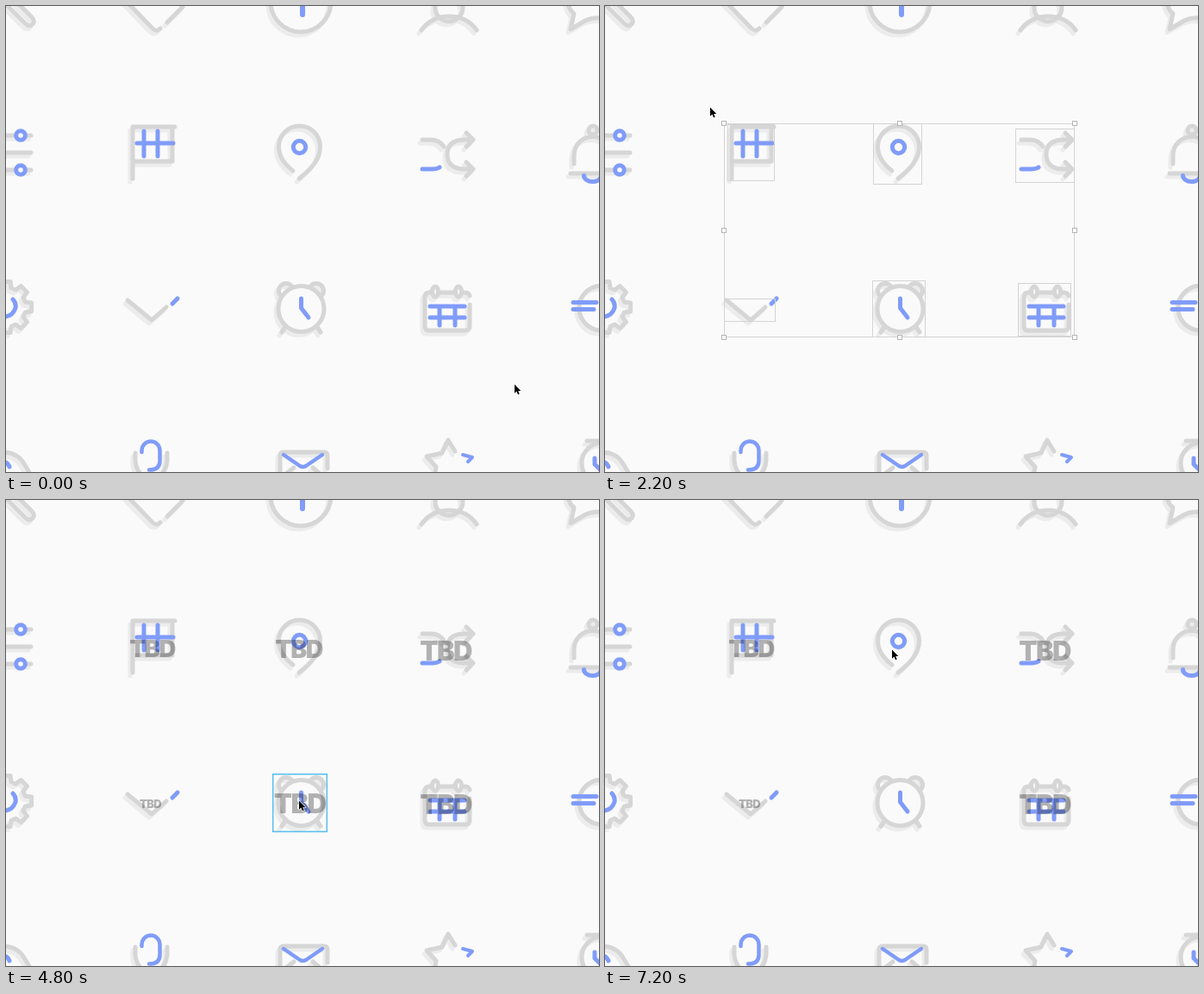
An HTML page that plays this animation: 688 by 540 pixels, repeating every 7.4 s.

```html
<!DOCTYPE html>
<html lang="en">
<head>
<meta charset="utf-8">
<title>Icon selection</title>
<style>
  html, body { margin: 0; width: 100%; height: 100%; overflow: hidden; background: #fafafa; }
  svg { display: block; width: 688px; height: 540px; }
  .line, .shade, .accent { fill: none; stroke-width: 5; stroke-linecap: round; stroke-linejoin: round; }
  .line { stroke: #d6d6d6; }
  .shade { stroke: #ececec; }
  .accent { stroke: #809cf9; }
  .solid { fill: #fafafa; }
  .label { font-family: Inter, "Open Sans", sans-serif; font-weight: 900; letter-spacing: -.055em; text-anchor: middle; fill: #000; fill-opacity: .29; }
  .frame { fill: none; stroke: #d4d4d4; }
  .handle { fill: #fff; stroke: #b4b4b4; }
  #marquee { fill: #000; fill-opacity: .036; stroke: #000; stroke-opacity: .12; }
  #hover { fill: none; stroke: #5cc0ee; stroke-width: 1.6; }
</style>
</head>
<body>
<svg viewBox="0 0 688 540">
  <g id="icons"></g>
  <g id="selection"></g>
  <rect id="hover"/>
  <rect id="marquee"/>
  <path id="cursor" d="M0 .5V10.700L2.400 8.600L4 12.300L5.700 11.600L4.200 8H7.300Z" fill="#000" stroke="#fff" stroke-width="1.2" paint-order="stroke"/>
</svg>
<script>
const LOOP = 7400, TICK = 100;
const $ = id => document.getElementById(id);
const path = d => `<path d="${d}"/>`;
const circle = (x, y, r, cls = '') => `<circle cx="${x}" cy="${y}" r="${r}" class="${cls}"/>`;
const oval = (x, y) => `<ellipse cx="${x}" cy="${y}" rx="3.5" ry="6" class="solid"/>`;

function gear(x, y, inner, outer) {
  const pts = [];
  for (let i = 0; i < 8; i++) {
    for (const [da, r] of [[-.27, inner], [-.17, outer], [.17, outer], [.27, inner]]) {
      const a = i * Math.PI / 4 + da;
      pts.push((x + r * Math.cos(a)).toFixed(1) + ' ' + (y + r * Math.sin(a)).toFixed(1));
    }
  }
  return path('M' + pts.join('L') + 'Z');
}

// box: x1, y1, x2, y2; label: centre x, baseline, size
const icons = [
  { line: path('M2 0L22 20Q27 25 31 21Q34 17 30 13L14 -3') },
  { line: path('M141 -4L169 25Q174 31 179 26M187 19L205 1') },
  { line: circle(342, -5, 35), accent: path('M344 -5V10'), width: 6 },
  { line: circle(514, 2, 16) + path('M482 28Q493 12 514 12Q535 12 546 28') },
  { line: path('M652 -4Q653 4 659 9L655 27L672 17Q680 13 692 14') },

  { line: path('M-4 150H29M-4 170H29M-4 190H29'),
    accent: circle(17, 150, 5.3, 'solid') + circle(17, 190, 5.3, 'solid') },
  { line: path('M147 200V140H196M193 140V180H148'),
    accent: path('M152 159H194M160 145V174M176 145V174'),
    box: [142, 137, 197, 203], label: [169.5, 181.5, 27.5] },
  { line: path('M333 191C320 181 316.500 172 316.500 163A24 24 0 0 1 364.500 163C364.500 178 355 188 340 200'),
    accent: circle(340.5, 163.5, 7.2),
    box: [311, 136, 368, 207], label: [339.5, 183, 28.5] },
  { line: path('M483 155H493Q503 155 508 163M541 155H530Q512 156 512 172Q512 188 530 189H541M534 147L542 155L534 163M534 181L542 189L534 197'),
    accent: path('M483 189H494Q500 189 503 187'),
    box: [476, 142, 545, 205], label: [510, 185.5, 31] },
  { line: circle(681, 144, 5) + path('M659 183V174C659 144 703 144 703 174V183M655 194H695'),
    accent: path('M670.500 196.500A10 7 0 0 0 690.500 196.500') },

  { line: gear(0, 349, 23, 30), accent: path('M8 340Q12 344 11 350Q8 359 -1 360') },
  { line: path('M141 341L169 364L186 349'), accent: path('M193 345L199 339'),
    box: [138, 339, 198, 366], label: [167.5, 357, 13] },
  { line: circle(325, 330, 8.5) + circle(360, 330, 8.5) + path('M324 372L320 378M361 372L365 378') + circle(342.5, 351, 26.5, 'solid'),
    accent: path('M342.500 339V350L351 361'),
    box: [310, 318, 372, 384], label: [340.5, 363, 31] },
  { line: path('M538 336Q537 332 532 332H491Q486 332 486 337V371Q486 376 491 376H533Q538 376 538 371V346') + oval(498, 331) + oval(525, 331),
    accent: path('M492 348H532M492 361H532M503 348V370M521 348V370'),
    box: [479, 321, 541, 383], label: [510, 363.5, 31] },
  { line: circle(691, 350, 26), accent: path('M658 343.500H685M658 351.500H682') },

  { line: path('M-4 517Q14 517 22 532L28 542'), accent: path('M-3 528Q2 529 4 534') },
  { line: path('M150 518V527Q151 538 158 544M187 518V527Q186 538 179 544'),
    accent: path('M157.500 517V515A10.500 10.500 0 0 1 178.500 515V527Q178.500 537 168 537.500H166'), width: 4.5 },
  { line: path('M318 544V521Q318 517 322 517H369Q373 517 373 521V536M326 541L334 535M356 535L363 541'),
    accent: path('M322 520L341 533Q344.500 535 348 533L367 520'), width: 4.5 },
  { line: path('M521 516L513 503L506 518L488 522L499 534L497 546'),
    accent: path('M530 520L541 523L536 528'), width: 4 },
  { line: path('M674 504H692') + circle(692, 530, 24), accent: path('M683 524V531L690 538') }
];

$('icons').innerHTML = icons.map(({ line, accent = '', width = 5, label }) => `
  <g class="shade" transform="translate(-3 4)">${line}</g>
  <g class="line">${line}</g>
  <g class="accent" style="stroke-width:${width}">${accent}</g>
  ${label ? `<text class="label" x="${label[0]}" y="${label[1]}" font-size="${label[2]}">TBD</text>` : ''}`).join('');

const targets = icons.filter(i => i.box);
const labels = [...document.querySelectorAll('.label')];
const PIN = 1, CLOCK = 4;
const START = [590.5, 438.5];

// time, x, y
const track = [
  [0, 590, 438], [900, 123, 118], [1000, 122, 117], [2600, 122, 117],
  [3400, 146, 155], [4300, 316, 408], [4500, 316, 408], [4800, 340, 348],
  [5400, 340, 348], [6200, 362, 230], [6300, 354, 220], [6600, 333, 173]
];

function cursorAt(t) {
  const i = track.findIndex(k => k[0] > t);
  if (i < 0) return track[track.length - 1].slice(1);
  const [t0, x0, y0] = track[i - 1], [t1, x1, y1] = track[i];
  const e = (1 - Math.cos(Math.PI * (t - t0) / (t1 - t0))) / 2;
  return [x0 + (x1 - x0) * e, y0 + (y1 - y0) * e];
}

const during = (t, from, to) => t >= from && t < to;
const show = (el, on) => { el.style.display = on ? '' : 'none'; };

function place(el, [x1, y1, x2, y2]) {
  const attrs = { x: x1, y: y1, width: x2 - x1, height: y2 - y1 };
  for (const name in attrs) {
    el.setAttribute(name, Math.max(0, attrs[name]));
  }
}

function frame([x1, y1, x2, y2]) {
  return `<rect class="frame" x="${x1 + .5}" y="${y1 + .5}" width="${x2 - x1 - 1}" height="${y2 - y1 - 1}"/>`;
}

function selectionMarkup(boxes) {
  if (!boxes.length) return '';
  const edge = (i, pick) => pick(...boxes.map(b => b[i]));
  const all = [edge(0, Math.min), edge(1, Math.min), edge(2, Math.max), edge(3, Math.max)];
  const [x1, y1, x2, y2] = all;
  let out = boxes.map(frame).join('') + frame(all);
  for (const u of [0, .5, 1]) for (const v of [0, .5, 1]) {
    if (u === .5 && v === .5) continue;
    const x = Math.round(x1 + (x2 - x1) * u) - 2.5, y = Math.round(y1 + (y2 - y1) * v) - 2.5;
    out += `<rect class="handle" x="${x}" y="${y}" width="5" height="5"/>`;
  }
  return out;
}

function render(t) {
  const [x, y] = cursorAt(t).map(Math.round);
  $('cursor').setAttribute('transform', `translate(${x} ${y})`);

  const dragging = during(t, 100, 1100);
  show($('marquee'), dragging);
  if (dragging) place($('marquee'), [x + .5, y + 1.5, ...START]);

  const touched = ({ box }) => !dragging || (box[2] > x && box[3] > y);
  const boxes = during(t, 100, 4300) ? targets.filter(touched).map(i => i.box) : [];
  $('selection').innerHTML = selectionMarkup(boxes);

  const ends = { [PIN]: 6800, [CLOCK]: 5200 };
  labels.forEach((el, i) => show(el, during(t, 2800, ends[i] || LOOP)));

  const hovered = during(t, 4700, 5200) ? CLOCK : during(t, 6500, 6800) ? PIN : -1;
  show($('hover'), hovered >= 0);
  if (hovered >= 0) {
    const [x1, y1, x2, y2] = targets[hovered].box;
    place($('hover'), [x1 - .3, y1 - .3, x2 + .3, y2 + .3]);
  }
}

const begin = performance.now();
function loop() {
  const t = (performance.now() - begin) % LOOP;
  render(Math.floor(t / TICK) * TICK);
  requestAnimationFrame(loop);
}
loop();
</script>
</body>
</html>
```
